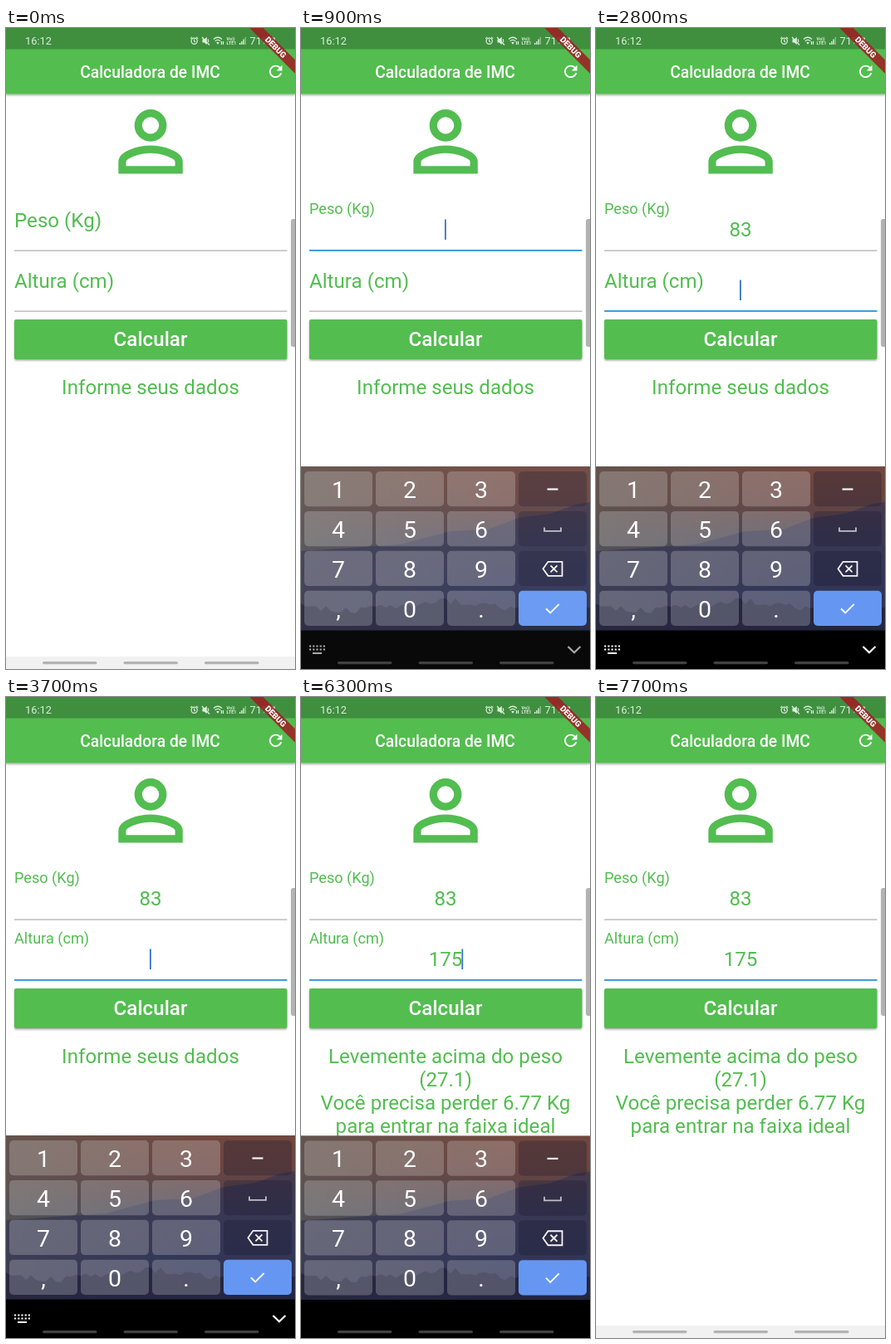
An HTML page for the animation above (8000 ms loop, 348 by 772 pixels).

```html
<!DOCTYPE html>
<html lang="pt">
<head>
<meta charset="utf-8">
<title>Calculadora de IMC</title>
<style>
  html, body { margin: 0; width: 100%; height: 100%; overflow: hidden; background: #fff; }
  svg { display: block; width: 100%; height: 100%; font-family: Roboto, "Noto Sans", sans-serif; }
  .green { fill: #52bd50; }
  .big { font-size: 24.15px; }
  .mid { text-anchor: middle; }
  .digit { font-size: 28.5px; fill: #fff; text-anchor: middle; }
  .line { fill: none; stroke: #fff; }
</style>
</head>
<body>
<svg viewBox="0 0 348 772" preserveAspectRatio="none">
  <defs>
    <linearGradient id="sky" x1="0" y1="0" x2="0" y2="1">
      <stop offset="0" stop-color="#70483f"/>
      <stop offset=".2" stop-color="#694541"/>
      <stop offset=".45" stop-color="#494454"/>
      <stop offset=".75" stop-color="#3a3d5c"/>
      <stop offset="1" stop-color="#33355a"/>
    </linearGradient>
    <linearGradient id="haze" x1="0" y1="0" x2="1" y2="0">
      <stop offset="0" stop-color="#5d5a55" stop-opacity=".65"/>
      <stop offset=".7" stop-color="#5d5a55" stop-opacity="0"/>
    </linearGradient>
    <filter id="drop" x="-5%" y="-20%" width="110%" height="150%">
      <feDropShadow dx="0" dy="1.5" stdDeviation="1.3" flood-opacity=".35"/>
    </filter>
  </defs>

  <rect width="348" height="772" fill="#fff"/>
  <rect y="25" width="348" height="54.5" fill="#52bd50" filter="url(#drop)"/>
  <rect width="348" height="25.5" fill="#3f8f3f"/>

  <g fill="#dcefdc">
    <text x="23" y="20.3" font-size="12.8">16:12</text>
    <text x="293.5" y="20.3" font-size="12.8">71%</text>
    <text x="265.5" y="14.6" font-size="5.4" font-weight="700">Vo))</text>
    <text x="265.5" y="20" font-size="5.4" font-weight="700">LTE1</text>
    <path d="M236.5 13.5h2.3l3-2.7v9.4l-3-2.7h-2.3z"/>
    <path d="M281 18h1.4v2h-1.4zM283.2 16h1.4v4h-1.4zM285.4 13.5h1.4v6.500h-1.4z"/>
    <path d="M287.600 11h1.4v9h-1.4z" opacity=".5"/>
    <rect x="318" y="11.500" width="6" height="9" rx="1"/>
    <path d="M255 19.800l-1.800-2.200a2.600 2.600 0 0 1 3.600 0z"/>
  </g>
  <g fill="none" stroke="#dcefdc" stroke-width="1.2">
    <circle cx="226.700" cy="15.700" r="3.600"/>
    <path d="M226.700 13.500v2.500l1.500 1M222.200 12.800l2-2M231.200 12.800l-2-2M236 11l9 9.500M243 13.300q1.500 2 .5 4"/>
    <path d="M250 13.500q5-4.500 10 0M251.700 15.800q3.300-3 6.600 0M259.500 16v4M261.500 20v-4"/>
  </g>

  <text class="mid" x="173.500" y="59.500" font-size="19.300" font-weight="500" fill="#fff">Calculadora de IMC</text>
  <path transform="translate(313.200 40.800) scale(.966)" fill="#fff" d="M17.650 6.350C16.200 4.900 14.210 4 12 4c-4.420 0-7.990 3.580-7.990 8s3.570 8 7.990 8c3.730 0 6.840-2.550 7.730-6h-2.080c-.82 2.330-3.040 4-5.650 4-3.310 0-6-2.690-6-6s2.690-6 6-6c1.660 0 3.140.69 4.220 1.780L13 11h7V4z"/>
  <g transform="translate(348 0) rotate(45) scale(.966)">
    <rect x="-42" y="28" width="84" height="12" fill="#a01c22" fill-opacity=".86"/>
    <text class="mid" y="37.600" font-size="10.200" font-weight="900" fill="#fff">DEBUG</text>
  </g>

  <g transform="translate(116 78.700) scale(4.840)" fill="none" stroke="#52bd50" stroke-width="1.900">
    <circle cx="12" cy="8" r="3.050"/>
    <path d="M4.950 17C4.950 15.300 9 13.950 12 13.950S19.050 15.300 19.050 17V19.050H4.950Z"/>
  </g>

  <g id="fields"></g>

  <rect x="10" y="351" width="328.500" height="48" rx="2" fill="#52bd50" filter="url(#drop)"/>
  <text class="big mid" x="174" y="383.300" font-weight="500" fill="#fff">Calcular</text>
  <g id="result" class="green big mid"></g>

  <rect y="757" width="348" height="15" fill="#f1f1f1"/>
  <g id="board">
    <rect y="528" width="348" height="198" fill="url(#sky)"/>
    <rect y="528" width="348" height="198" fill="url(#haze)"/>
    <path d="M348 571L330 574 300 585 262 590 225 604 180 606 120 622 0 630V726H348Z" fill="#2c3052" opacity=".55"/>
    <path id="bush" fill="#20223a" opacity=".75"/>
    <rect y="725.500" width="348" height="300" fill="#000"/>
    <g id="keys"></g>
    <g id="tools">
      <path d="M10 744.500h19M10 748.500h19" stroke="#fff" stroke-width="2.200" stroke-dasharray="2.200 2"/>
      <path d="M14 753h11" stroke="#fff" stroke-width="2"/>
      <path class="line" stroke-width="2.200" d="M321.500 745l7.500 7.200 7.500-7.200"/>
    </g>
  </g>
  <g id="pills"></g>
  <path d="M348 230h-2a3 3 0 0 0-3 3v148a3 3 0 0 0 3 3h2z" fill="#b3b3b3"/>
</svg>
<script>
const LOOP = 8000;
const $ = id => document.getElementById(id);

function add(parent, tag, attrs, text = '') {
  const el = document.createElementNS('http://www.w3.org/2000/svg', tag);
  for (const k in attrs) el.setAttribute(k, attrs[k]);
  el.textContent = text;
  return parent.appendChild(el);
}

// Last value whose time has come
const step = (t, list) => list.reduce((v, [at, next]) => t >= at ? next : v, list[0][1]);

// Piecewise linear track
function track(t, list) {
  if (t <= list[0][0]) return list[0][1];
  for (let i = 1; i < list.length; i++) {
    const [a, va] = list[i - 1], [b, vb] = list[i];
    if (t < b) return va + (vb - va) * (t - a) / (b - a);
  }
  return list[list.length - 1][1];
}

function makeField(label, y) {
  const g = $('fields');
  return {
    y,
    label: add(g, 'text', { class: 'green', x: 10 }, label),
    line: add(g, 'rect', { x: 10, width: 328.5 }),
    value: add(g, 'text', { class: 'green big mid', x: 174, y: y - 16.6 }),
    caret: add(g, 'rect', { y: y - 37.5, width: 1.8, height: 24.5, fill: '#3475c8' })
  };
}

function drawField(f, lift, focused, text, caretOn) {
  f.label.setAttribute('y', f.y - 28 - 16.4 * lift);
  f.label.setAttribute('font-size', 24.15 - 6.04 * lift);
  f.line.setAttribute('y', focused ? f.y - 1.1 : f.y - .4);
  f.line.setAttribute('height', focused ? 2 : 1);
  f.line.setAttribute('fill', focused ? '#3898dc' : '#9c9c9c');
  f.value.textContent = text;
  f.caret.setAttribute('x', 173 + text.length * 6.8);
  f.caret.setAttribute('opacity', focused && caretOn ? 1 : 0);
}

function makeKeys() {
  const g = $('keys');
  [...'123-456_789<,0.>'].forEach((c, i) => {
    const col = i % 4, row = i >> 2, x = 4 + col * 86, y = 534 + row * 47.9;
    const fill = c === '>' ? '#6597f2' : col === 3 ? 'rgba(20,20,45,.28)' : 'rgba(255,255,255,.21)';
    add(g, 'rect', { x, y, width: 82, height: 42.3, rx: 5, fill });
    const icons = {
      '-': ['M-6.500 0h13', 2.2],
      '_': ['M-10 -2v4.500h20v-4.500', 1.8],
      '<': ['M-11.500 0l6-8.500h17v17h-17zM-2.500 -4l8 8M5.500 -4l-8 8', 1.8],
      '>': ['M-8 0l5.200 5.200 10.500-10.500', 2]
    };
    const place = `translate(${x + 41} ${y + 21.5})`;
    if (icons[c]) {
      add(g, 'path', {
        class: 'line', d: icons[c][0], 'stroke-width': icons[c][1],
        transform: place, opacity: c === '_' ? .7 : .95
      });
    } else add(g, 'text', { class: 'digit', x: x + 41, y: y + 32 }, c);
  });
}

function makeBush() {
  let d = 'M0 726', seed = 7;
  for (let x = 0; x <= 348; x += 6) {
    seed = seed * 16807 % 2147483647;
    d += `L${x} ${692 + 5 * Math.sin(x / 37) + seed % 9}`;
  }
  $('bush').setAttribute('d', d + 'L348 726Z');
}

makeKeys();
makeBush();
const weight = makeField('Peso (Kg)', 268);
const height = makeField('Altura (cm)', 341);
[44, 141.5, 239].forEach(x => add($('pills'), 'rect', { x, y: 763, width: 65.5, height: 3.2, rx: 1.6 }));

const hint = ['Informe seus dados'];
const answer = ['Levemente acima do peso', '(27.1)', 'Você precisa perder 6.77 Kg', 'para entrar na faixa ideal'];
let shown;
function showResult(lines) {
  if (shown === lines) return;
  shown = lines;
  $('result').textContent = '';
  lines.forEach((s, i) => add($('result'), 'text', { x: 174, y: 440.8 + 28.1 * i }, s));
}

const caretSteps = [[0, 0], [700, 1], [1200, 0], [1700, 1], [2600, 0], [2800, 1], [3300, 0], [3700, 1],
  [4300, 0], [4500, 1], [5000, 0], [5100, 1], [5700, 0], [6200, 1], [6700, 0], [7200, 1], [7700, 0]];
const weightText = [[0, ''], [1800, '8'], [2100, '83']];
const heightText = [[0, ''], [3800, '1'], [4500, '17'], [5100, '175']];
const slide = [[700, 60], [800, 10], [900, 0], [6300, 0], [6400, 45], [6500, 150]];
const fade = [[700, 0], [800, .88], [950, 1], [6300, 1], [6400, .6], [6500, 0]];

function draw(t) {
  const focus = step(t, [[0, 0], [700, 1], [2800, 2]]);
  const caret = step(t, caretSteps);
  drawField(weight, track(t, [[700, 0], [800, .65], [900, 1]]), focus === 1, step(t, weightText), caret);
  drawField(height, track(t, [[2800, 0], [2900, .65], [3000, 1]]), focus === 2, step(t, heightText), caret);
  showResult(t < 6200 ? hint : answer);

  const alpha = track(t, fade);
  $('board').setAttribute('transform', `translate(0 ${track(t, slide)})`);
  $('board').setAttribute('opacity', alpha);
  $('tools').setAttribute('opacity', t < 6250 ? track(t, [[750, 0], [800, .3], [1000, 1]]) : 0);
  $('pills').setAttribute('fill', alpha > .5 ? '#414141' : '#b2b2b2');
  $('pills').setAttribute('opacity', t >= 6400 && t < 6900 ? 0 : 1);
}

const start = performance.now();
function tick() {
  draw((performance.now() - start) % LOOP);
  requestAnimationFrame(tick);
}
tick();
</script>
</body>
</html>
```
